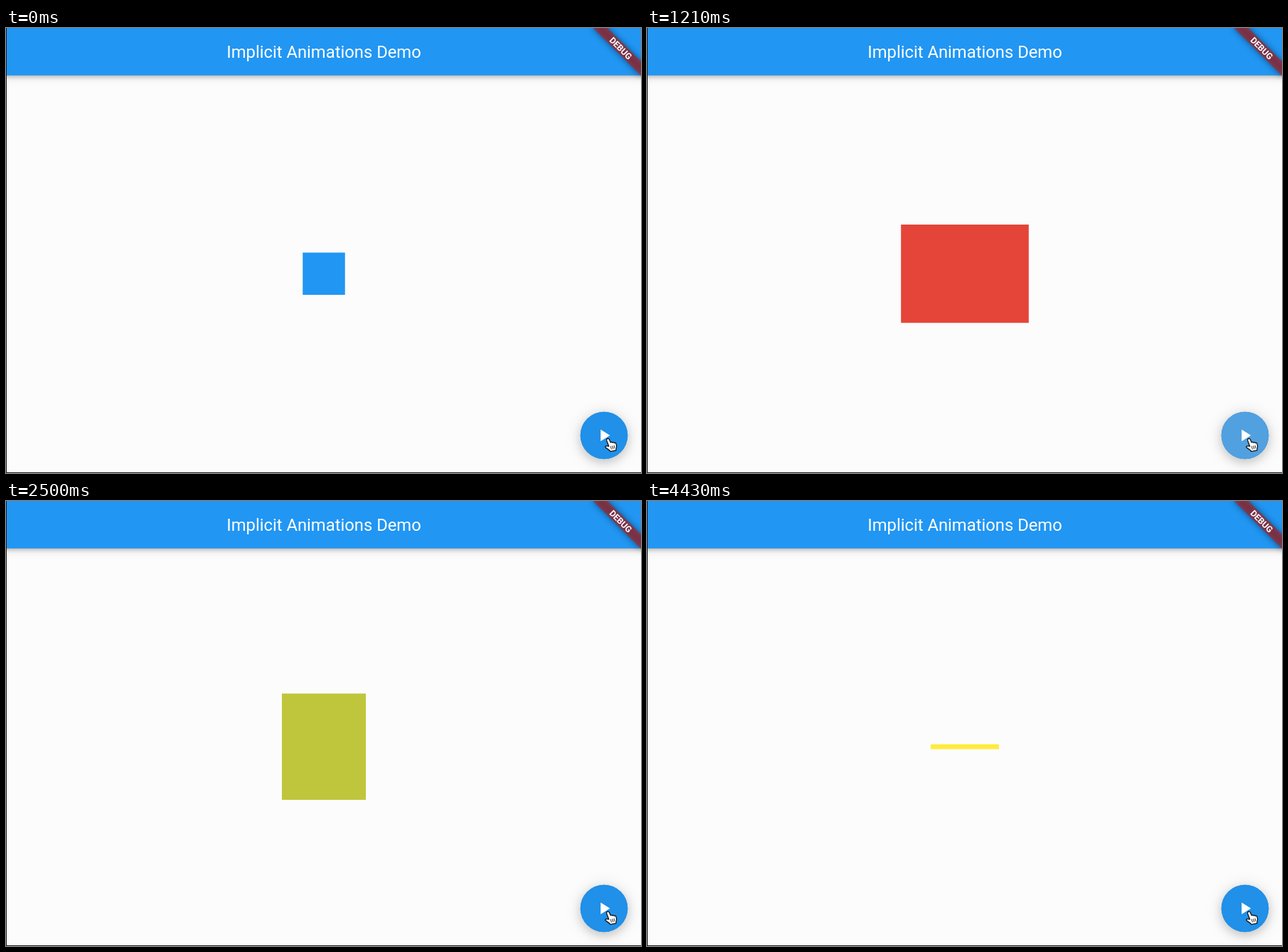
These frames come from a looping animation (893 px wide and 627 px high, 4850 ms). An HTML page with a canvas:

```html
<!DOCTYPE html>
<html lang="en">
<head>
<meta charset="utf-8">
<title>Implicit Animations Demo</title>
<style>
  html, body { margin: 0; width: 100%; height: 100%; overflow: hidden; background: #fcfcfc; }
  canvas { display: block; width: 893px; height: 627px; }
</style>
</head>
<body>
<canvas id="stage" width="893" height="627"></canvas>
<script>
const ctx = document.getElementById('stage').getContext('2d');
const W = 893, H = 627, UNIT = 1.19;
const LOOP = 4850, FPS = 14, MORPH = 500, FADE = 200;
const BLUE = '#2196f3';
const BOX = { x: 447, y: 346.2 };
const BUTTON = { x: 841, y: 574, r: 33.3 };
const TAP_POINT = { x: 847, y: 579 };

const start = { w: 59.5, h: 59.5, rgb: [33, 150, 243] };
// Each tap: press and release times, then the size and colour the box eases to.
const taps = [
  { down: 130, up: 264, w: 192, h: 125.2, rgb: [244, 67, 54] },
  { down: 1085, up: 1153, w: 91.4, h: 233.6, rgb: [121, 85, 72] },
  { down: 1985, up: 2082, w: 123.3, h: 133.4, rgb: [205, 220, 57] },
  { down: 2890, up: 2977, w: 50.7, h: 65.6, rgb: [139, 195, 74] },
  { down: 3820, up: 3907, w: 95.9, h: 6.8, rgb: [255, 235, 59] }
];

const playIcon = new Path2D('M8 5v14l11-7z');
const hand = new Path2D(
  'M845.6 578.6q1.6-.9 2.7 1l2 4.3q1.6-1.3 2.7 .3q1.7-1.1 2.6 .5q1.9-.7 2.4 1.2' +
  'q1.2 3.5 .3 6l-.6 3.2l-7.8 1.6q-1.5-2.3-5-4.3q-2.6-1.4-2-2.6q1-1.5 4.9-.4' +
  'l-3.1-8.2q-.5-1.8 .9-2.6z');
const handCreases = new Path2D('M850.4 589.6l1 3.6M852.8 589l1 3.6M855.1 588.5l.9 3.5');

const clamp = v => Math.min(1, Math.max(0, v));
const lerp = (a, b, p) => a + (b - a) * p;

// Snap to the 14 fps grid, whose frame changes fall on 10 ms ticks.
function sampleTime(t) {
  let k = Math.floor((t + 5) * FPS / 1000);
  if (Math.round(k * 100 / FPS) * 10 > t) k--;
  return k * 1000 / FPS;
}

function circle(x, y, r, fill) {
  ctx.beginPath();
  ctx.arc(x, y, r, 0, Math.PI * 2);
  ctx.fillStyle = fill;
  ctx.fill();
}

function withShadow(color, dy, blur, draw) {
  ctx.save();
  ctx.shadowColor = color;
  ctx.shadowOffsetY = dy;
  ctx.shadowBlur = blur;
  draw();
  ctx.restore();
}

function drawBox(t) {
  let from = start, to = start, p = 1;
  for (const tap of taps) {
    if (t < tap.up) break;
    from = to;
    to = tap;
    p = clamp((t - tap.up) / MORPH);
  }
  const w = lerp(from.w, to.w, p), h = lerp(from.h, to.h, p);
  ctx.fillStyle = `rgb(${from.rgb.map((c, i) => Math.round(lerp(c, to.rgb[i], p)))})`;
  ctx.fillRect(BOX.x - w / 2, BOX.y - h / 2, w, h);
}

function drawHeader() {
  const bar = () => {
    ctx.fillStyle = BLUE;
    ctx.fillRect(-20, -20, W + 40, 86.5);
  };
  withShadow('rgba(0,0,0,.2)', 2, 5, bar);
  withShadow('rgba(0,0,0,.13)', 3, 12, bar);
  ctx.font = '400 23.8px Roboto, sans-serif';
  ctx.textAlign = 'center';
  ctx.fillStyle = '#fff';
  ctx.fillText('Implicit Animations Demo', 447, 42);
}

function drawBanner() {
  ctx.save();
  ctx.translate(W, 0);
  ctx.rotate(Math.PI / 4);
  ctx.scale(UNIT, UNIT);
  ctx.filter = 'blur(4.7px)';
  ctx.fillStyle = 'rgba(0,0,0,.5)';
  ctx.fillRect(-40, 28, 80, 12);
  ctx.filter = 'none';
  ctx.fillStyle = 'rgba(183,28,28,.627)';
  ctx.fillRect(-40, 28, 80, 12);
  ctx.font = '700 10.2px Roboto, sans-serif';
  ctx.fillStyle = '#fff';
  ctx.fillText('DEBUG', 0, 37.6);
  ctx.restore();
}

function drawRipple(t) {
  const tap = taps.find(({ down, up }) => t >= down && t < up + FADE);
  if (!tap) return;
  const held = Math.min(t, tap.up) - tap.down;
  const released = Math.max(0, t - tap.up);
  const glow = clamp((held - released) / FADE);
  const grow = clamp(held / 1000 + released / 48);
  ctx.save();
  ctx.beginPath();
  ctx.arc(BUTTON.x, BUTTON.y, BUTTON.r, 0, Math.PI * 2);
  ctx.clip();
  circle(BUTTON.x, BUTTON.y, BUTTON.r + 1, `rgba(188,188,188,${0.4 * glow})`);
  circle(lerp(TAP_POINT.x, BUTTON.x, grow), lerp(TAP_POINT.y, BUTTON.y, grow), 57 * grow,
    `rgba(200,200,200,${0.4 * (1 - released / FADE)})`);
  ctx.restore();
}

function drawButton(t) {
  const disc = () => circle(BUTTON.x, BUTTON.y, BUTTON.r, '#2090e9');
  withShadow('rgba(0,0,0,.16)', 5, 14, disc);
  withShadow('rgba(0,0,0,.12)', 2, 24, disc);
  drawRipple(t);
  ctx.save();
  ctx.translate(BUTTON.x, BUTTON.y);
  ctx.scale(UNIT, UNIT);
  ctx.translate(-12, -12);
  ctx.fillStyle = '#fff';
  ctx.fill(playIcon);
  ctx.restore();
}

function drawCursor() {
  ctx.lineJoin = ctx.lineCap = 'round';
  ctx.fillStyle = '#fff';
  ctx.strokeStyle = '#111';
  ctx.lineWidth = 1.3;
  ctx.fill(hand);
  ctx.stroke(hand);
  ctx.lineWidth = 0.9;
  ctx.stroke(handCreases);
}

function drawEdges() {
  ctx.fillStyle = '#1c1c20';
  ctx.fillRect(0, 0, 1, H);
  ctx.fillRect(0, H - 1, W, 1);
}

function render(now) {
  const t = sampleTime(now % LOOP);
  ctx.fillStyle = '#fcfcfc';
  ctx.fillRect(0, 0, W, H);
  drawBox(t);
  drawHeader();
  drawBanner();
  drawButton(t);
  drawCursor();
  drawEdges();
}

const origin = performance.now();
function tick() {
  render(performance.now() - origin);
  requestAnimationFrame(tick);
}
tick();
</script>
</body>
</html>
```
